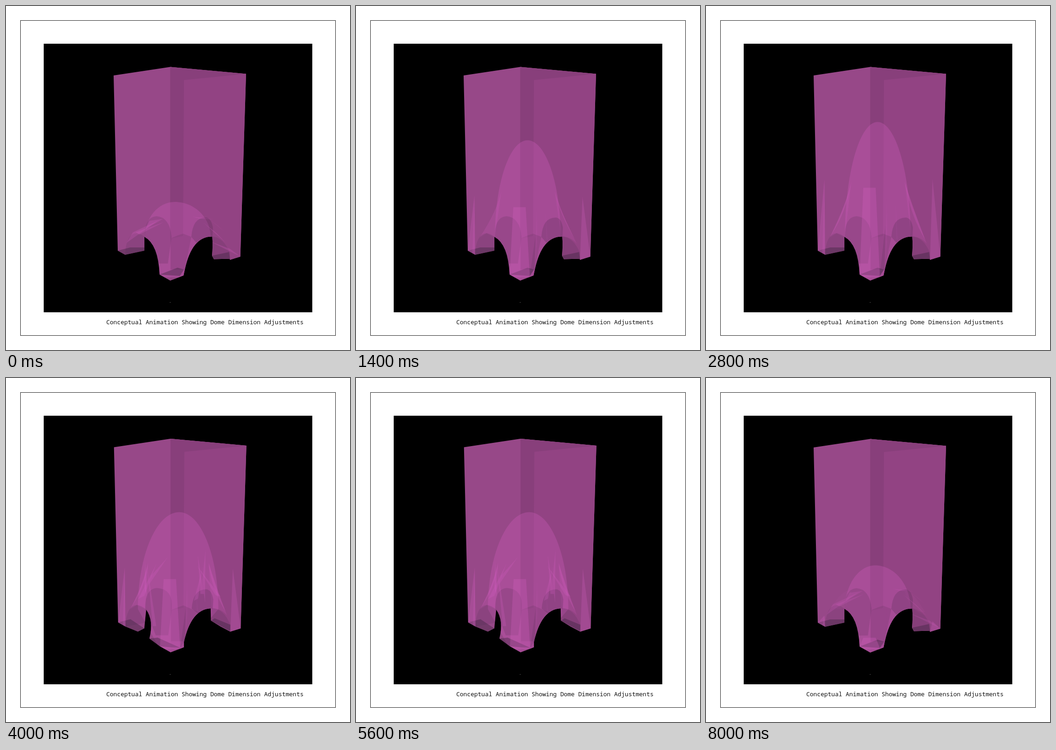
Write an HTML page with a canvas that moves like this. It is 748 px wide and 748 px high and loops after 8200 ms.

```html
<!DOCTYPE html>
<html lang="en">
<head>
<meta charset="utf-8">
<title>Dome Dimension Adjustments</title>
<style>
  html, body { margin: 0; width: 100%; height: 100%; overflow: hidden; background: #fff; }
  #stage { position: relative; width: 748px; height: 748px; }
  canvas { position: absolute; left: 0; top: 0; }
  p {
    position: absolute; left: 218px; top: 678px; margin: 0;
    font: 13px/18px "Noto Sans Mono", "DejaVu Sans Mono", monospace;
    color: #111; white-space: pre;
  }
</style>
</head>
<body>
<div id="stage">
  <canvas id="view" width="748" height="748"></canvas>
  <p>Conceptual Animation Showing Dome Dimension Adjustments</p>
</div>
<script>
const c = document.getElementById('view').getContext('2d');
const STEP = 200, COUNT = 41;
const mix = (a, b, k) => a + (b - a) * k;
const pink = a => `rgba(210,92,190,${a})`;
const shade = a => `rgba(55,35,60,${a})`;

// Path strings hold M, L, Q commands; a second string gives the wide pose.
function path(a, b = a, k = 0) {
  const other = b.match(/[\d.]+/g);
  let i = 0;
  return new Path2D(a.replace(/[\d.]+/g, v => mix(+v, +other[i++], k).toFixed(2)));
}

function fill(shape, color) {
  c.fillStyle = color;
  c.fill(typeof shape === 'string' ? new Path2D(shape) : shape);
}

const BODY = [
  'M234 151 L357 132.5 L522 147.5 L509.5 545 L487 552 L486.5 549.5 L452 550.5 L448 543 Q450 522 448.5 501.5 Q405 500 389 572 L386 586 L357 597 L334 584 L334 584 Q331 518 301 502 L301 532 L280 536.5 L259 541 L243 532 Z',
  'M234 151 L357 132.5 L522 147.5 L509.5 545 L487 552 L487 552 L466 541 L445 528 Q445 515 444.5 501.5 Q402 503 386 575 L386 586 L357 597 L334 584 L311 567 Q321 528 304 504 L300 545 L286 552 L259 541 L243 532 Z'
];
const FEET = [
  ['M243 532 L270 525 L301 525 L301 532 L259 541 Z', 'M243 532 L270 525 L300 545 L286 552 L259 541 Z'],
  ['M448 543 L485 535 L487 549 L452 550.5 Z', 'M445 528 L453 523 L487 537 L487 551 Z'],
  ['M334 584 L373 569 L387 573 L378 587 L334 584 Z', 'M311 567 L329 565 L378 587 L356 586 L334 584 Z']
];
const LEFT_WALL = 'M259 541 Q261 495 284 494 Q293 495 303 503 L301 533 Z';
const RIGHT_WALL = 'M446 501 Q472 501 487 537 L487 550 L450 550 Z';

// Streaks of the low dome, then of the wide one: tip and two base points.
const LOW = [
  [330, 467, 262, 515, 276, 492], [343, 470, 290, 497, 282, 492],
  [312, 467, 303, 485, 341, 463], [405, 458, 452, 464, 420, 462],
  [428, 470, 478, 515, 458, 494], [440, 462, 476, 491, 462, 479],
  [444, 512, 487, 528, 510, 545]
];
const WIDE = [
  [302, 398, 300, 455, 306, 480], [327, 403, 287, 481, 300, 474],
  [307, 415, 318, 540, 326, 540], [351, 390, 315, 430, 310, 450],
  [433, 374, 426, 440, 432, 490], [416, 384, 422, 470, 430, 470],
  [427, 410, 408, 485, 417, 480], [414, 408, 455, 473, 466, 476]
];
function tri([x, y, a, b, d, e], color) {
  fill(`M${x} ${y} L${a} ${b} L${d} ${e} Z`, color);
}

function pose(n) {
  let level = n;
  if (n > 12) level = Math.max(7, 12 - 1.5 * (n - 12));
  if (n >= 34) level = COUNT - n;
  const wide = Math.max(0, 1 - Math.abs(n - 24) / 8.7) / 0.54;
  return { level, wide };
}

function domePath(level, wide) {
  const top = 426 - 18.5 * level - 0.09 * level * level;
  const x = 367 + Math.min(6, level * 0.85) + wide * 3;
  const l = 302 - 16 * wide, r = 445 + 16 * wide, base = 503;
  const q = 0.5523, h = base - top;
  return new Path2D(`M${l} ${base} C${l} ${base - h * q} ${x - (x - l) * q} ${top} ${x} ${top}
    C${x + (r - x) * q} ${top} ${r} ${base - h * q} ${r} ${base} L387 590 L334 590 Z`);
}

function drawWings(level, wide) {
  const tip = 476 - 10.5 * level;
  const tall = Math.min(1, level / 5);
  const l = 316 - 8 * wide, r = 432 + 8 * wide;
  fill(`M${l} ${tip} Q${l - 9} ${tip + 45} 269 503 L284 494 L302 503 Z`, pink(0.2 * tall));
  fill(`M${l} ${tip} Q${l - 10} ${tip + 48} 272 498 Q304 452 ${l} ${tip} Z`, pink(0.26 * tall));
  fill(`M${r} ${tip} Q${r + 13} ${tip + 45} 480 517 Q467 501 446 501 Z`, pink(0.17 * tall));
  fill(`M${r} ${tip} Q${r + 14} ${tip + 48} 477 509 Q444 455 ${r} ${tip} Z`, pink(0.25 * tall));
  tri([393, tip + 35, 389, 570, 394, 515], pink(0.13 * tall));
  tri([412, tip + 42, 414, 506, 417, 512], pink(0.13 * tall));
}

function drawSolid(level, wide) {
  const k = Math.min(1, wide);
  const body = path(BODY[0], BODY[1], k);
  c.save();
  c.translate(0.75 * wide, -0.4 * wide);
  fill(body, '#974888');
  c.clip(body);

  fill('M357 130 L524 146 L515 610 L357 610 Z', '#924383');
  fill('M357 132 L522 147.5 L387 161 L385 500 L357 506 Z', '#883f7b');

  const dome = domePath(level, wide);
  fill(dome, pink(0.3));
  drawWings(level, wide);

  // Far arches and the far pier
  const gap = 14 * k;
  fill(`M302 503 Q301 459 327 457 Q${356 + gap / 2} 459 360 502 L352 560 L325 560 Z`, shade(0.15));
  fill(`M403 502 Q406 460 434 460 Q446 460 450 482 L449 502 Q430 500 ${414 + gap / 2} 515 Z`, shade(0.19));
  fill(`M358 506 Q364 502 385 495 L${403 + 1.6 * gap} ${502 + 0.8 * gap} L391 560 L388 573 L358 573 Z`, shade(0.13));

  fill(LEFT_WALL, shade(0.12));
  fill(RIGHT_WALL, shade(0.12));
  for (const [a, b] of FEET) fill(path(a, b, k), shade(0.38));

  // Spikes rising from the piers
  const column = 586 - 21.2 * level;
  if (level > 0) {
    fill(`M342 ${column} L369 ${column} L378 587 L357 597 L334 584 Z`, pink(0.3));
    tri([257.5, 534 - 17.5 * level, 243, 532, 259, 541], pink(0.26));
    tri([257.5, 534 - 17.5 * level, 253, 538, 259, 541], pink(0.2));
    tri([492.5, 548 - 19.1 * level, 487, 552, 509.5, 545], pink(0.26));
    tri([390, 586 - 12 * level, 378, 587, 388, 572], shade(0.12));
  }

  const low = Math.max(0, 1 - level / 5);
  for (const s of LOW) tri(s, pink(0.25 * low));
  for (const s of WIDE) tri(s, pink(0.24 * k));
  c.restore();
}

function draw(n) {
  c.fillStyle = '#fff';
  c.fillRect(0, 0, 748, 748);
  c.strokeStyle = '#222';
  c.lineWidth = 1;
  c.strokeRect(31.5, 31.5, 685, 685);
  c.fillStyle = '#000';
  c.fillRect(82, 82, 584, 584);
  c.fillStyle = '#555';
  c.fillRect(356, 644, 2, 1);
  const { level, wide } = pose(n);
  drawSolid(level, wide);
}

const start = performance.now();
let shown = -1;
function tick() {
  const n = Math.floor((performance.now() - start) / STEP) % COUNT;
  if (n !== shown) draw(shown = n);
  requestAnimationFrame(tick);
}
tick();
</script>
</body>
</html>
```
